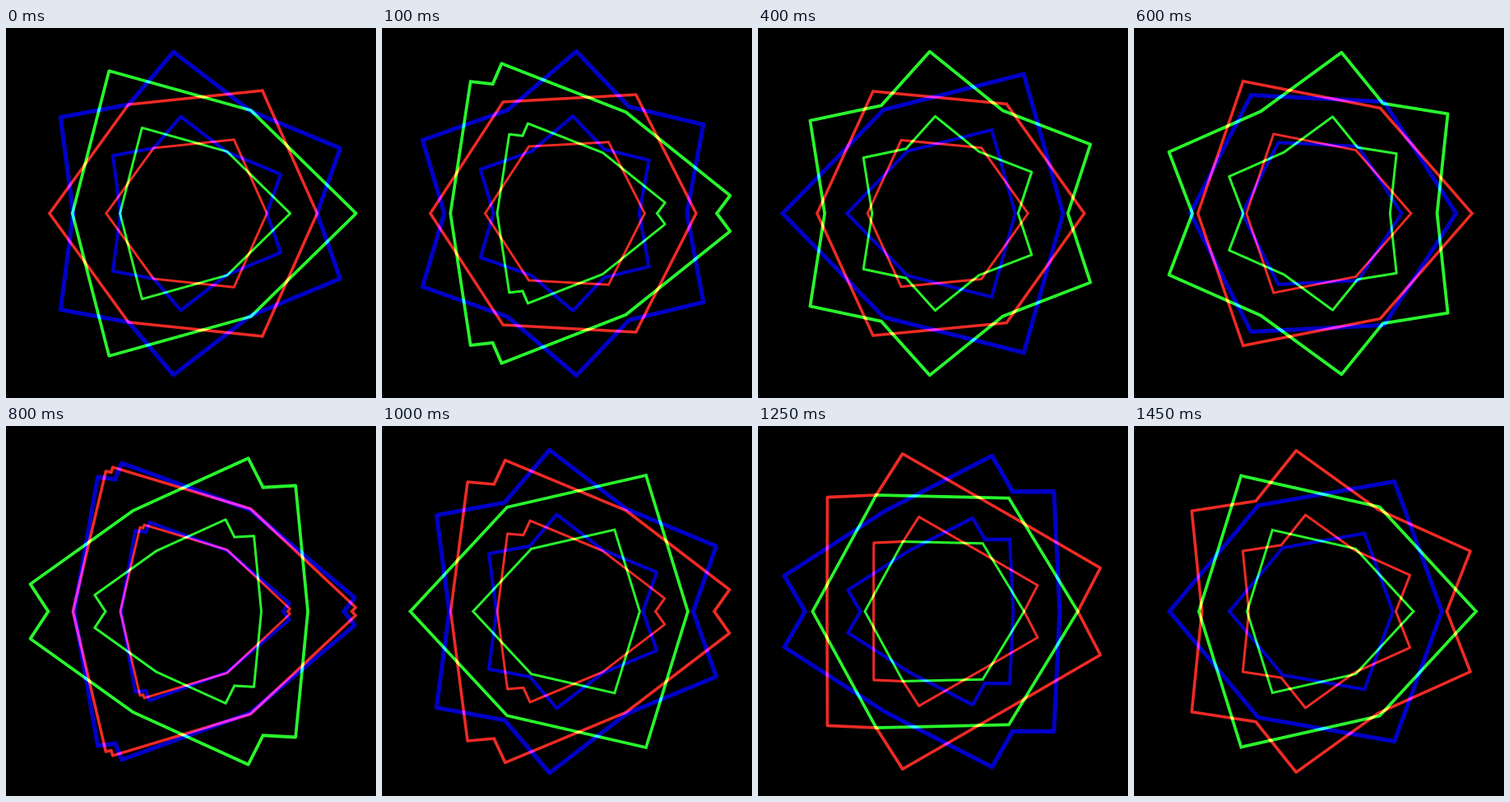
Write an HTML page with a canvas that moves like this. It is 450 by 450 pixels and loops after 1.5 s.

```html
<!DOCTYPE html>
<html lang="en">
<head>
<meta charset="utf-8">
<title>Kaleidoscope squares</title>
<style>
  html, body { margin: 0; height: 100%; overflow: hidden; background: #000; }
  canvas { display: block; }
</style>
</head>
<body>
<canvas width="450" height="450"></canvas>
<script>
const ctx = document.querySelector('canvas').getContext('2d');
const LOOP = 1500, STEP = 50;
const CENTER = 225.5;
const STRETCH = 1.055; // widens each mirrored wedge across its bisector
const RAD = Math.PI / 180;

// Angles in degrees, speeds in degrees per second
const layers = [
  { color: 'rgb(0,0,200)', start: 24, speed: 90, widths: [5, 4] },
  { color: 'rgb(240,42,36)', start: 68.7, speed: 30, widths: [3.5, 2.9] },
  { color: 'rgb(40,248,44)', start: 1.4, speed: 60, widths: [3.7, 2.9] },
];
const apothems = [139.6, 83.8];

function strokeSquare(apothem, angle, color, width) {
  const radius = apothem * Math.SQRT2;
  ctx.beginPath();
  for (let i = 0; i < 4; i++) {
    const a = (angle + i * 90) * RAD;
    ctx.lineTo(radius * Math.cos(a), radius * Math.sin(a));
  }
  ctx.closePath();
  ctx.strokeStyle = color;
  ctx.lineWidth = width;
  ctx.stroke();
}

function drawWedge(index, seconds) {
  ctx.save();
  ctx.rotate((index * 60 + 30) * RAD);
  ctx.beginPath();
  ctx.moveTo(0, 0);
  ctx.lineTo(300, -300 * Math.tan(30 * RAD));
  ctx.lineTo(300, 300 * Math.tan(30 * RAD));
  ctx.clip();
  ctx.scale(1, index % 2 ? -STRETCH : STRETCH);
  for (const { color, start, speed, widths } of layers) {
    const angle = start + speed * seconds - 30;
    apothems.forEach((apothem, i) => strokeSquare(apothem, angle, color, widths[i]));
  }
  ctx.restore();
}

function draw(ms) {
  ctx.setTransform(1, 0, 0, 1, 0, 0);
  ctx.globalCompositeOperation = 'source-over';
  ctx.fillStyle = '#000';
  ctx.fillRect(0, 0, 450, 450);
  ctx.globalCompositeOperation = 'lighter';
  ctx.lineJoin = 'round';
  ctx.translate(CENTER, CENTER);
  for (let i = 0; i < 6; i++) drawWedge(i, ms / 1000);
}

const origin = performance.now();
function tick() {
  const ms = (performance.now() - origin) % LOOP;
  draw(Math.floor(ms / STEP) * STEP);
  requestAnimationFrame(tick);
}
tick();
</script>
</body>
</html>
```
